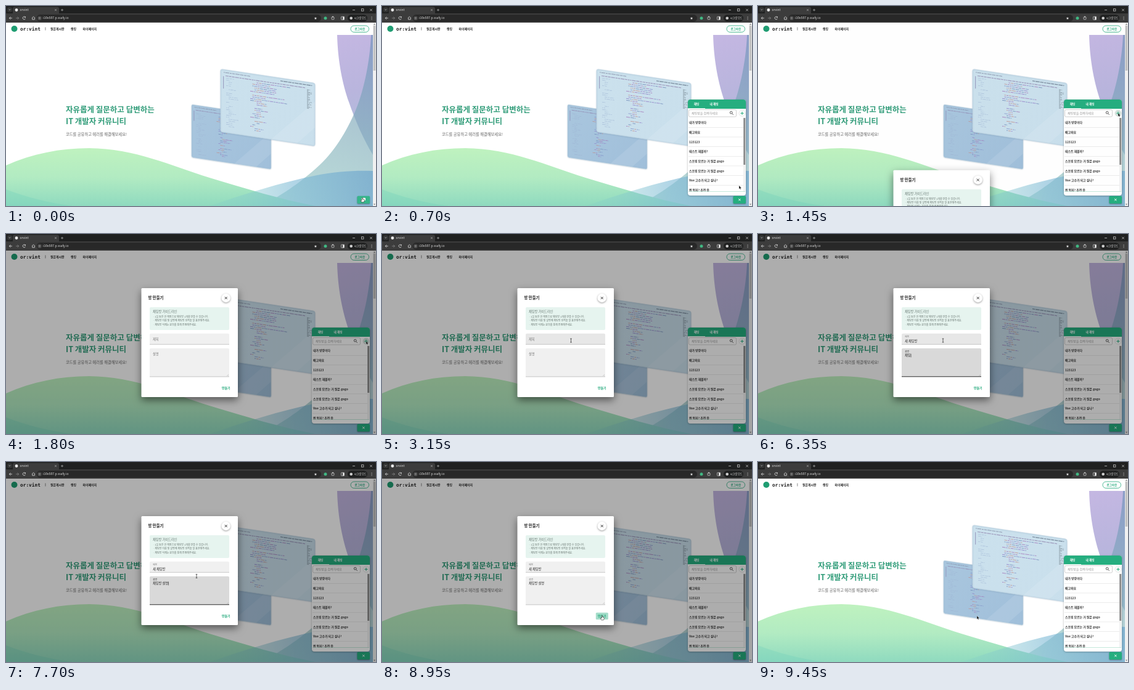
These frames come from a looping animation (600x325 px, 9500 ms). An HTML page with a canvas:

```html
<!DOCTYPE html>
<html lang="ko">
<head>
<meta charset="utf-8">
<style>
html, body { margin: 0; width: 100%; height: 100%; overflow: hidden; background: #fff; }
canvas { display: block; width: 600px; height: 325px; }
</style>
</head>
<body>
<canvas id="stage" width="600" height="325"></canvas>
<script>
const ctx = document.getElementById('stage').getContext('2d');
const LOOP = 9500;
const SANS = '"Noto Sans CJK KR", "Noto Sans CJK", "Noto Sans", sans-serif';
const MONO = '"DejaVu Sans Mono", monospace';
const GREEN = '#22a97b';

const OPEN_CHAT = 400, OPEN_DIALOG = 1430, FOCUS_TITLE = 3450;
const FOCUS_DESC = 5400, BLUR_DESC = 8800, CLOSE_DIALOG = 9180;

const clamp = v => Math.max(0, Math.min(1, v));
const progress = (t, start, length) => clamp((t - start) / length);
const smooth = p => p * p * (3 - 2 * p);
const mix = (a, b, p) => a + (b - a) * p;

// y of a CSS cubic-bezier at x
function bezier(x, x1, y1, x2, y2) {
  let lo = 0, hi = 1;
  const at = (s, a, b) => 3 * a * s * (1 - s) ** 2 + 3 * b * s * s * (1 - s) + s ** 3;
  for (let i = 0; i < 24; i++) {
    const mid = (lo + hi) / 2;
    if (at(mid, x1, x2) < x) lo = mid; else hi = mid;
  }
  return at(lo, y1, y2);
}

function randomizer(seed) {
  return () => (seed = (seed * 16807) % 2147483647) / 2147483647;
}

function rect(x, y, w, h, color) {
  ctx.fillStyle = color;
  ctx.fillRect(x, y, w, h);
}

function round(x, y, w, h, r, fill, stroke, width = 0.7) {
  ctx.beginPath();
  ctx.roundRect(x, y, w, h, r);
  if (fill) { ctx.fillStyle = fill; ctx.fill(); }
  if (stroke) { ctx.strokeStyle = stroke; ctx.lineWidth = width; ctx.stroke(); }
}

function circle(x, y, r, fill, stroke, width = 0.7) {
  round(x - r, y - r, 2 * r, 2 * r, r, fill, stroke, width);
}

function line(d, color, width = 0.8) {
  ctx.strokeStyle = color;
  ctx.lineWidth = width;
  ctx.stroke(new Path2D(d));
}

function area(d, fill) {
  ctx.fillStyle = fill;
  ctx.fill(new Path2D(d));
}

function cross(x, y, r, color, width = 0.9) {
  line(`M${x - r} ${y - r}L${x + r} ${y + r}M${x + r} ${y - r}L${x - r} ${y + r}`, color, width);
}

function plus(x, y, r, color, width = 0.9) {
  line(`M${x - r} ${y}H${x + r}M${x} ${y - r}V${y + r}`, color, width);
}

// y is the visual middle of the text
function text(s, x, y, size, color, weight = 400, align = 'left', family = SANS) {
  ctx.font = `${weight} ${size}px ${family}`;
  ctx.textAlign = align;
  ctx.fillStyle = color;
  ctx.fillText(s, x, y + size * 0.37);
}

function gradient(x0, y0, x1, y1, ...colors) {
  const g = ctx.createLinearGradient(x0, y0, x1, y1);
  colors.forEach((c, i) => g.addColorStop(i / (colors.length - 1), c));
  return g;
}

function shadowed(blur, dy, color, draw) {
  ctx.save();
  ctx.shadowBlur = blur;
  ctx.shadowOffsetY = dy;
  ctx.shadowColor = color;
  draw();
  ctx.restore();
}

function drawBrowser() {
  rect(0, 0, 600, 13, '#1f2020');
  round(2, 2, 8, 8, 2.5, '#343535');
  line('M4.7 5.4L6 6.7L7.3 5.4', '#ddd', 0.7);
  round(11, 1.5, 75, 13, 3, '#3c3c3c');
  circle(17, 6.5, 2.4, '#eee');
  text('orvint', 22.5, 6.5, 5, '#e4e4e4');
  cross(80.5, 6.5, 1.4, '#ccc', 0.6);
  plus(91, 6.5, 2, '#ccc', 0.6);
  line('M562 6.5h4', '#ddd', 0.7);
  ctx.strokeStyle = '#ddd';
  ctx.strokeRect(576.5, 4.7, 3.4, 3.4);
  cross(592, 6.5, 1.8, '#ddd', 0.7);

  rect(0, 12, 600, 15, '#3c3c3c');
  line('M10 19.7H5.5M7.5 17.5L5.3 19.7L7.5 21.9', '#ddd');
  line('M16 19.7h4.5M18.5 17.5l2.2 2.2l-2.2 2.2', '#888');
  line('M31.3 18.2A2.3 2.3 0 1 0 31.5 20.5M31.5 17v1.6h-1.7', '#ddd');
  line('M42 19.5l2.5-2.2l2.5 2.2M42.7 19.2v2.7h3.6v-2.7', '#ddd');
  round(49.5, 14, 461.5, 11.5, 5.7, '#282828');
  circle(54.5, 19.7, 3.7, '#3d3d3d');
  line('M52.7 18.7h3.5M52.7 20.8h3.5', '#ddd', 0.6);
  text('i10e507.p.ssafy.io', 60, 19.6, 5, '#e4e4e4');
  text('★', 502, 19.6, 6, '#e8e8e8', 400, 'center', '"DejaVu Sans", sans-serif');
  circle(518, 19.7, 2.5, '#41b883');
  round(528, 17.8, 4, 4, 0.7, null, '#ddd');
  circle(530, 17.5, 0.9, '#ddd');
  round(543.5, 17.3, 5, 5, 0.7, null, '#ddd');
  rect(546, 17.3, 2.5, 5, '#ddd');
  round(554, 14.2, 32, 11, 5.5, '#1f2020');
  circle(559.7, 19.7, 2.3, '#d0d0d0');
  text('시크릿 모드', 564.5, 19.7, 4.2, '#eee');
  for (let i = -1; i < 2; i++) circle(593, 19.7 + i * 2, 0.55, '#ddd');
}

function drawWaves() {
  area('M537 47C538 90 546 128 556 156C567 188 581 219 595 242V47Z',
    gradient(540, 47, 590, 230, '#c4b7e2', '#b9b5dd', '#aebfdb'));
  area('M592 47C590 93 579 143 565 174C547 215 527 241 509 258C476 289 441 311 413 325H595V47Z',
    gradient(595, 47, 500, 325, 'rgba(118,148,190,.72)', 'rgba(128,170,186,.65)', 'rgba(140,196,190,.6)'));
  area('M0 259C43 240 87 231 135 231C210 232 266 259 330 279C390 297 444 314 502 325H0Z',
    gradient(0, 231, 0, 325, '#bff2bf', '#b2ebc2', '#8fdabf'));
  area('M0 298C34 311 70 320 108 325H0Z', 'rgba(110,205,185,.3)');
  area('M330 325C385 306 445 287 504 275C535 269 565 267 595 268V325Z',
    gradient(340, 315, 595, 280, 'rgba(130,205,200,.25)', 'rgba(126,186,214,.6)', 'rgba(110,165,205,.7)'));
}

function drawCodeWindow(x, y, scale, top, bottom, seed) {
  const rnd = randomizer(seed);
  const inks = ['#8b75c4', '#7f8fc9', '#a06fb4', '#c08a86', '#6a83b5'];
  const w = 153, h = 102;
  const dashes = (x0, x1, yy, color, thick = 1) => {
    for (let p = x0; p < x1;) {
      const len = Math.min(1.5 + rnd() * 5, x1 - p);
      rect(p, yy, len, thick, color || inks[Math.floor(rnd() * inks.length)]);
      p += len + 0.9;
    }
  };
  ctx.save();
  ctx.transform(scale, 0.15 * scale, 0, scale, x, y);
  shadowed(2, 0.5, 'rgba(80,110,140,.25)', () =>
    round(0, 0, w, h, 3, gradient(0, 0, w, h, top, bottom), '#bdd5e3', 0.7));
  ctx.beginPath();
  ctx.roundRect(0, 0, w, h, 3);
  ctx.clip();
  area('M82 102L153 30V72L124 102Z', 'rgba(255,255,255,.1)');
  ctx.globalAlpha = 0.75;
  dashes(5, 48, 4, '#7b849c', 1);
  dashes(97, 149, 4, '#5f7183', 1.3);
  dashes(8, 137, 9.2, '#8f83ad', 1.2);
  rect(4, 11, 1.2, 20, '#8c8bb4');
  for (let i = 0; i < 28; i++) {
    const yy = 13 + i * 3;
    const inset = 9 + (i % 4 > 1 ? 4 : 0);
    if (rnd() > 0.18) dashes(inset, inset + 4 + rnd() * 12, yy, '#9bb0d0', 0.7);
    const indent = 48 + Math.floor(rnd() * 4) * 3.5;
    const length = i < 10 ? 20 + rnd() * 42 : 4 + rnd() * 18;
    if (i % 7 !== 6) dashes(indent, indent + length, yy, null, 1);
    if (i < 16) dashes(140, 142 + rnd() * 6, 12 + i * 2, '#75858f', 0.9);
  }
  ctx.restore();
}

function drawPage() {
  rect(0, 27, 600, 298, '#fff');
  drawWaves();
  drawCodeWindow(301, 160, 0.842, '#a9c6de', '#a0bfda', 77);
  drawCodeWindow(348, 102.5, 1, '#cbe1ed', '#c9dfec', 4242);

  rect(0, 27, 595, 20, '#fff');
  circle(13.5, 37, 5, '#1f9d72');
  text('or:vint', 23, 37, 7.8, '#1c1c1c', 700, 'left', MONO);
  rect(63.6, 34.5, 0.7, 5, '#555');
  text('질문게시판', 72, 37.2, 4.9, '#222', 700);
  text('랭킹', 105, 37.2, 4.9, '#222', 700);
  text('마이페이지', 124.5, 37.2, 4.9, '#222', 700);
  round(559, 32, 29.5, 10.5, 5.2, '#fff', GREEN, 0.8);
  text('로그아웃', 573.8, 37.2, 4.7, GREEN, 700, 'center');

  text('자유롭게 질문하고 답변하는', 97, 168.5, 12.5, '#329d7a', 700);
  text('IT 개발자 커뮤니티', 97, 187.5, 12.5, '#329d7a', 700);
  text('코드를 공유하고 에러를 해결해보세요!', 97, 208.5, 6.3, '#666');

  rect(595, 27, 5, 298, '#f1f1f1');
  rect(595.7, 32, 3.6, 73, '#c1c1c1');
  area('M596 30.5h3l-1.5-2Z', '#777');
  area('M596 321.5h3l-1.5 2Z', '#777');
}

function drawChat(hoverAdd) {
  const rooms = ['내가 방장이다', '배고파요', '123123', '테스트 해볼까?', '스프링 모르는 거 질문 gogo',
    '스프링 모르는 거 질문 gogo', 'Vue 고수가 되고 싶나?', '뭐 먹지? 추천 좀'];
  shadowed(3, 0.7, 'rgba(0,0,0,.3)', () => round(496, 152, 94, 156, 4, '#fff'));
  round(496, 152, 94, 15, [4, 4, 0, 0], '#25ae7f');
  text('채팅', 510, 159.7, 4.7, '#fff', 700, 'center');
  text('내 채팅', 538.5, 159.7, 4.7, '#fff', 700, 'center');
  rect(496, 166, 28, 1, '#d9f3e8');
  round(497.5, 168.5, 77, 11.5, 2, '#fff', '#bdbdbd');
  text('채팅방을 검색하세요', 502, 174.2, 5, '#999');
  circle(566.2, 173.2, 1.9, null, '#444', 0.9);
  line('M567.6 174.6l2.2 2.2', '#444', 0.9);
  circle(584, 174.3, 5, hoverAdd ? '#d5e4de' : '#fff', '#cfcfcf', 0.5);
  plus(584, 174.3, 2.6, GREEN, 1);
  ctx.save();
  ctx.beginPath();
  ctx.rect(496, 181, 94, 120.5);
  ctx.clip();
  rooms.forEach((name, i) => {
    const y = 189.5 + i * 15.65;
    text(name, 498, y, 4.9, '#333', 700);
    rect(497, y + 7.5, 89, 0.6, '#dedede');
  });
  rect(586, 181, 3.5, 121, '#f1f1f1');
  rect(586.2, 182, 3, 76, '#8c8c8c');
  ctx.restore();
  rect(497, 301.3, 92, 0.6, '#9ed9c3');
}

function drawChatButton(open, hover) {
  shadowed(2, 1, 'rgba(0,0,0,.35)', () =>
    round(569.5, 308.8, 20.5, 12.2, 1.5, hover ? '#35b58a' : '#25ae7f'));
  if (open) cross(579.8, 314.8, 1.7, '#fff', 0.9);
  else {
    round(576.5, 311.7, 6.5, 4.6, 1, '#fff');
    area('M577.5 316h2.5l-2.5 2Z', '#fff');
  }
}

// Typed stages of Hangul composition, one per 100 ms
const TITLE = ['ㅅ', '새', '새 ', '새 ㅊ', '새 채', '새 챝', '새 채티', '새 채팅', '새 채팅ㅂ', '새 채팅바', '새 채팅방'];
const DESC = ['ㅊ', '채', '챝', '채티', '채팅', '채팅ㅂ', '채팅바', '채팅방', '채팅방 ',
  '채팅방 ㅅ', '채팅방 서', '채팅방 설', '채팅방 설ㅁ', '채팅방 설며', '채팅방 설명'];

function typed(stages, start, t) {
  const i = Math.floor((t - start) / 100);
  return i < 0 ? '' : stages[Math.min(i, stages.length - 1)];
}

function drawField({ y, h, label, restY, value, focus, blur, hover, t, typedAt }) {
  const active = t >= focus && t < blur;
  const on = smooth(progress(t, focus, 150));
  const shade = Math.round(240 - 23 * on * (1 - progress(t, blur, 150)) - (hover && !active ? 9 : 0));
  round(233, y, 129, h, [2, 2, 0, 0], `rgb(${shade},${shade},${shade})`);
  rect(233, y + h - 0.5, 129, 0.5, '#999');
  if (active) rect(297.5 - 64.5 * on, y + h - 0.9, 129 * on, 0.9, '#333');
  text(label, 238, mix(restY, y + 4.7, on), mix(5.2, 3.9, on), active ? '#333' : '#777');
  if (t < focus) return;
  const baseY = y + 11.8;
  text(value, 238, baseY, 5.2, '#222');
  const end = 238 + ctx.measureText(value).width;
  const typing = t >= typedAt && t < typedAt + 1500;
  if (active && (typing || (t - focus) % 1000 < 500)) rect(end + 0.2, baseY - 2.9, 0.6, 5.8, '#222');
}

function drawDialog(t, pointer) {
  let shift = 251 * (1 - bezier(progress(t, OPEN_DIALOG, 225), 0, 0, 0.2, 1));
  shift += 251 * bezier(progress(t, CLOSE_DIALOG, 125), 0.4, 0, 1, 1);
  ctx.save();
  ctx.translate(0, shift);
  shadowed(13, 5, 'rgba(0,0,0,.5)', () => round(219.5, 88, 156.5, 177, 1.5, '#fff'));
  text('방 만들기', 230.5, 104, 6.4, '#222', 700);
  shadowed(3, 1, 'rgba(0,0,0,.4)', () => circle(356.7, 104, 7.2, '#fff'));
  cross(356.7, 104, 2, '#222', 0.9);

  round(233, 119, 129, 37, 2, '#e6f4ef');
  text('채팅방 가이드라인', 238, 126.5, 5.2, '#657670');
  text('· 1일 동안 한 계정으로 채팅방 1개를 만들 수 있습니다.', 238, 134.7, 4.05, '#66736e');
  text('· 채팅방 이름 및 설명에 채팅방 성격을 잘 표현해주세요.', 238, 141, 4.05, '#66736e');
  text('· 채팅방 삭제는 문의를 통해 진행해주세요.', 238, 147.3, 4.05, '#66736e');

  const inField = (y, h) => pointer.x > 233 && pointer.x < 362 && pointer.y > y && pointer.y < y + h;
  drawField({ y: 161.8, h: 17.6, label: '제목', restY: 170.7, value: typed(TITLE, 3850, t),
    focus: FOCUS_TITLE, blur: FOCUS_DESC, typedAt: 3850, hover: inField(161.8, 17.6), t });
  drawField({ y: 185.7, h: 46.5, label: '설명', restY: 194.7, value: typed(DESC, 5900, t),
    focus: FOCUS_DESC, blur: BLUR_DESC, typedAt: 5900, hover: inField(185.7, 46.5), t });
  line('M358 231l3-3M360 231l1-1', '#999', 0.4);

  if (pointer.x > 346 && pointer.x < 367 && pointer.y > 245 && pointer.y < 256)
    round(346.8, 244.8, 20, 11.2, 1.5, t > BLUR_DESC ? '#a5ddca' : '#dff3ec');
  text('만들기', 356.8, 250.3, 4.9, GREEN, 700, 'center');
  ctx.restore();
}

const MOVES = [
  { start: 550, end: 1150, x: 584, y: 174 },
  { start: 2150, end: 3250, x: 300, y: 173 },
  { start: 7500, end: 8300, x: 357, y: 252 },
  { start: 9250, end: 9430, x: 355, y: 250 },
];

function pointerAt(t) {
  let x = 578, y = 314;
  for (const m of MOVES) {
    const p = smooth(progress(t, m.start, m.end - m.start));
    x = mix(x, m.x, p);
    y = mix(y, m.y, p);
  }
  return { x, y };
}

function drawPointer({ x, y }, kind) {
  ctx.save();
  ctx.translate(x, y);
  ctx.lineJoin = 'round';
  if (kind === 'beam') {
    line('M-1.3 -3H1.3M0 -3V3M-1.3 3H1.3', '#222', 0.7);
  } else {
    const d = kind === 'hand'
      ? 'M-.8 -2.2Q0 -3 .6 -2.2V0L3.1 .6V3L2.2 4.8H-1.2L-3 1.8Q-2.7 .8 -.8 2Z'
      : 'M0 0V5.4L1.3 4.3L2.2 6.2L3.1 5.8L2.2 3.9H3.9Z';
    area(d, kind === 'hand' ? '#fff' : '#111');
    line(d, kind === 'hand' ? '#222' : '#eee', kind === 'hand' ? 0.6 : 0.3);
  }
  ctx.restore();
}

function pointerKind(t, { x, y }) {
  if (x > 569 && y > 308) return 'hand';
  const dialog = t > OPEN_DIALOG + 225 && t < CLOSE_DIALOG;
  if (dialog && x > 233 && x < 362 && y > 162 && y < 232) return 'beam';
  if (dialog && x > 346 && x < 367 && y > 245 && y < 256) return 'hand';
  return 'arrow';
}

function render(t) {
  const pointer = pointerAt(t);
  const chatOpen = t >= OPEN_CHAT;
  drawPage();
  if (chatOpen) drawChat(Math.hypot(pointer.x - 584, pointer.y - 174) < 5 && t < OPEN_DIALOG + 700);
  drawChatButton(chatOpen, pointer.x > 569 && pointer.y > 308);

  if (t >= OPEN_DIALOG && t < CLOSE_DIALOG + 300) {
    const shown = bezier(progress(t, OPEN_DIALOG, 300), 0.4, 0, 0.2, 1);
    const hidden = bezier(progress(t, CLOSE_DIALOG, 200), 0.4, 0, 0.2, 1);
    rect(0, 27, 600, 298, `rgba(0,0,0,${0.32 * shown * (1 - hidden)})`);
    if (t < CLOSE_DIALOG + 125) drawDialog(t, pointer);
  }
  drawBrowser();
  drawPointer(pointer, pointerKind(t, pointer));
}

const began = performance.now();
function tick() {
  render((performance.now() - began) % LOOP);
  requestAnimationFrame(tick);
}
tick();
</script>
</body>
</html>
```
